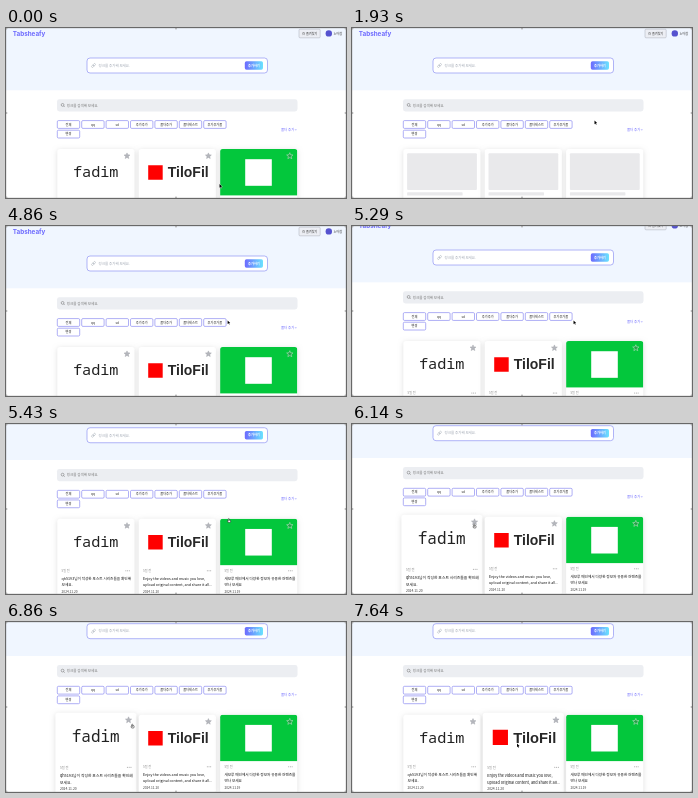
Recreate the animation shown at these times as an HTML page with a canvas. Size 340 by 170 pixels, loop 8000 ms.

```html
<!DOCTYPE html>
<html lang="ko">
<head>
<meta charset="utf-8">
<title>Link library</title>
<style>
  html, body { margin: 0; width: 100%; height: 100%; overflow: hidden; background: #fff; }
  canvas { display: block; width: 340px; height: 170px; }
</style>
</head>
<body>
<canvas id="stage"></canvas>
<script>
const W = 340, H = 170, LOOP = 8000, STEP = 1000 / 14;
const SANS = '"Noto Sans CJK KR", "Noto Sans CJK", "Noto Sans", sans-serif';
const PURPLE = '#6d6afe';
const canvas = document.getElementById('stage');
const ctx = canvas.getContext('2d');
const ratio = window.devicePixelRatio || 1;
canvas.width = W * ratio;
canvas.height = H * ratio;

// Key lists: [time, value, ...]
const SCROLL = [[5214, 0], [5286, 6], [5357, 18], [5429, 26.3], [5500, 27.4], [5643, 28.1], [5790, 28.3]];
const POINTER = [
  [0, 213.5, 156], [72, 223, 140], [143, 235, 112], [214, 242.5, 92.5],
  [2357, 242.5, 92.5], [2429, 237, 93], [2500, 228, 93.5], [2571, 222, 94],
  [5429, 221.5, 94.5], [5571, 205, 98], [5786, 130, 103], [6000, 121, 100],
  [6143, 121, 100], [6286, 160, 110], [6430, 235, 116], [6571, 240, 116],
  [6714, 165, 108], [6857, 125, 102], [6929, 126, 103],
  [7071, 126, 103], [7143, 132, 106], [7286, 160, 119], [7429, 165, 121.5]
];
const HOVER = [
  [[5720, 0], [5930, 1], [6210, 1], [6350, 0], [6650, 0], [6850, 1], [7130, 1], [7350, 0]],
  [[5590, 0], [5680, .5], [5850, 0], [6230, 0], [6330, .6], [6480, 0], [6600, 0], [6690, .6], [6820, 0], [7130, 0], [7400, 1]],
  [[5450, 0], [5570, .6], [5720, 0], [6360, 0], [6500, 1], [6590, 1], [6730, 0]]
];

const CHIPS = ['전체', 'qq', 'sd', '추가추가', '폴더추가', '폴더테스트', '추가추가폴', '변경'];
const CARDS = [
  { x: 51.3, art: codeArt, lines: ['qh5193님이 작성한 포스트 시리즈들을 확인해', '보세요.'], date: '2024.11.20' },
  { x: 132.7, art: videoArt, lines: ['Enjoy the videos and music you love,', 'upload original content, and share it all...'], date: '2024.11.20' },
  { x: 214.1, art: portalArt, lines: ['새모루 메인에서 다양한 정보와 유용한 컨텐츠를', '만나 보세요'], date: '2024.11.19' }
];
const CARD_W = 77.2, CARD_H = 78, CARD_Y = 121, ART_H = 46.4;

function sample(keys, t, i = 1) {
  if (t <= keys[0][0]) return keys[0][i];
  for (let k = 1; k < keys.length; k++) {
    const a = keys[k - 1], b = keys[k];
    if (t <= b[0]) return a[i] + (b[i] - a[i]) * (t - a[0]) / (b[0] - a[0]);
  }
  return keys[keys.length - 1][i];
}

function box(x, y, w, h, r, fill, stroke, line = .5) {
  ctx.beginPath();
  ctx.roundRect(x, y, w, h, r);
  if (fill) { ctx.fillStyle = fill; ctx.fill(); }
  if (stroke) { ctx.strokeStyle = stroke; ctx.lineWidth = line; ctx.stroke(); }
}

function disc(x, y, r, fill) {
  ctx.beginPath();
  ctx.arc(x, y, r, 0, Math.PI * 2);
  ctx.fillStyle = fill;
  ctx.fill();
}

function text(str, x, y, size, color, { align = 'left', weight = 400, font = SANS } = {}) {
  ctx.font = `${weight} ${size}px ${font}`;
  ctx.textAlign = align;
  ctx.textBaseline = 'alphabetic';
  ctx.fillStyle = color;
  ctx.fillText(str, x, y + size * .36);
}

function star(x, y, r, fill, stroke, line = .5) {
  ctx.beginPath();
  for (let i = 0; i < 10; i++) {
    const a = -Math.PI / 2 + i * Math.PI / 5, d = i % 2 ? r * .45 : r;
    ctx.lineTo(x + d * Math.cos(a), y + d * Math.sin(a));
  }
  ctx.closePath();
  if (fill) { ctx.fillStyle = fill; ctx.fill(); }
  ctx.strokeStyle = stroke;
  ctx.lineWidth = line;
  ctx.stroke();
}

function header() {
  ctx.fillStyle = '#f0f6ff';
  ctx.fillRect(0, 0, W, 62.3);
  text('Tabsheafy', 6.8, 5.4, 6.3, PURPLE, { weight: 700, font: 'Inter, sans-serif' });
  box(293, 1.2, 21.2, 8.6, 1, '#eceef4', '#a9adb8');
  star(297.6, 5.5, 1.5, null, '#555', .35);
  text('즐겨찾기', 300, 5.5, 3.1, '#333');
  disc(322.8, 5.4, 3.2, '#5552cf');
  text('노아람', 327.4, 5.4, 3.2, '#333');
}

function addForm() {
  box(81, 30, 180.5, 15, 3, '#fff', '#7f84f2', .6);
  ctx.save();
  ctx.translate(87.5, 37.5);
  ctx.rotate(-Math.PI / 4);
  box(-2.4, -.9, 2.7, 1.8, .9, null, '#9fa6b2', .45);
  box(-.3, -.9, 2.7, 1.8, .9, null, '#9fa6b2', .45);
  ctx.restore();
  text('링크를 추가해 보세요.', 92.5, 37.5, 3.5, '#9fa6b2');
  const blend = ctx.createLinearGradient(238.8, 0, 257, 0);
  blend.addColorStop(0, PURPLE);
  blend.addColorStop(1, '#6ae3fe');
  box(238.8, 33.2, 18.2, 8.6, 1.7, blend);
  text('추가하기', 247.9, 37.5, 3.2, '#fff', { align: 'center', weight: 700 });
}

function searchBar() {
  box(51, 71.3, 240.5, 12.2, 2.4, '#eceef2');
  ctx.beginPath();
  ctx.arc(56.6, 76.9, 1.4, 0, Math.PI * 2);
  ctx.moveTo(57.6, 77.9);
  ctx.lineTo(58.7, 79);
  ctx.strokeStyle = '#666';
  ctx.lineWidth = .5;
  ctx.stroke();
  text('링크를 검색해 보세요.', 60.8, 77.3, 3.5, '#777');
}

function folders() {
  CHIPS.forEach((name, i) => {
    const x = 51.3 + (i % 7) * 24.4, y = i < 7 ? 92.6 : 102.2;
    box(x, y, 22.4, 7.8, 1.2, '#fff', '#7a79ef', .6);
    text(name, x + 11.2, y + 3.9, 3.2, '#222', { align: 'center' });
  });
  text('폴더 추가 +', 291, 101.3, 3.45, PURPLE, { align: 'right' });
}

function codeArt(x) {
  text('fadim', x + 38.4, 143.4, 15.2, '#222', { align: 'center', font: '"Noto Sans Mono", monospace' });
}

function videoArt(x) {
  box(x + 9.5, 137.2, 14.5, 14.5, 0, '#f00');
  text('TiloFil', x + 29, 144.3, 14, '#282828', { weight: 700, font: '"Liberation Sans", sans-serif' });
}

function portalArt(x) {
  ctx.fillStyle = '#03c73c';
  ctx.fillRect(x, CARD_Y, CARD_W, ART_H);
  ctx.fillStyle = '#fff';
  ctx.fillRect(x + 25.1, 131.2, 26.6, 26.6);
}

function cardBase(x) {
  ctx.save();
  ctx.shadowColor = 'rgba(0,0,0,.13)';
  ctx.shadowBlur = 5 * ratio;
  ctx.shadowOffsetY = ratio;
  box(x, CARD_Y, CARD_W, CARD_H, 2.5, '#fff');
  ctx.restore();
}

function card({ x, art, lines, date }, hover) {
  const cx = x + CARD_W / 2, cy = CARD_Y + CARD_H / 2, scale = 1 + .05 * hover;
  ctx.save();
  ctx.translate(cx, cy);
  ctx.scale(scale, scale);
  ctx.translate(-cx, -cy);
  cardBase(x);
  ctx.save();
  ctx.beginPath();
  ctx.roundRect(x, CARD_Y, CARD_W, CARD_H, 2.5);
  ctx.clip();
  art(x);
  ctx.restore();
  if (art === portalArt) star(x + 69.7, 128, 3.3, 'rgba(80,110,85,.45)', '#d3e8d8');
  else star(x + 69.7, 128, 3.1, '#b4b6bc', '#a4a6ad');
  text('5일 전', x + 4.3, 173.2, 3.1, '#888');
  for (let i = 0; i < 3; i++) disc(x + 68.6 + i * 1.7, 173, .5, '#999');
  lines.forEach((line, i) => text(line, x + 4.3, 180.9 + i * 6.4, 3.65, '#111'));
  text(date, x + 4.3, 193.8, 3.2, '#333');
  ctx.restore();
}

function skeleton({ x }) {
  cardBase(x);
  box(x + 3.8, 125.2, 69.8, 36.8, 1, '#e9e9eb');
  box(x + 3.8, 164.3, 55.5, 3.3, .6, '#e9e9eb');
}

function pointer(x, y) {
  ctx.beginPath();
  for (const [dx, dy] of [[0, 0], [0, 3.7], [.9, 2.9], [1.5, 4.2], [2.1, 3.9], [1.5, 2.7], [2.6, 2.6]]) {
    ctx.lineTo(x + dx, y + dy);
  }
  ctx.closePath();
  ctx.strokeStyle = '#fff';
  ctx.lineWidth = .6;
  ctx.stroke();
  ctx.fillStyle = '#000';
  ctx.fill();
}

function hand(x, y) {
  box(x + .2, y + 1.5, 2.9, 2.5, .9, '#fff', '#111', .5);
  box(x + .8, y, .9, 2.6, .4, '#fff', '#111', .4);
}

function windowEdge() {
  ctx.strokeStyle = 'rgba(120,120,125,.35)';
  ctx.lineWidth = .5;
  ctx.strokeRect(.25, .25, W - .5, H - .5);
  for (const x of [.5, W / 2, W - .5]) {
    for (const y of [.5, H / 2, H - .5]) {
      if (x !== W / 2 || y !== H / 2) disc(x, y, .9, '#aaa');
    }
  }
}

function draw(now) {
  const t = Math.floor((now % LOOP + 5) / STEP) * STEP;
  const loading = t > 1900 && t < 4840;
  ctx.setTransform(ratio, 0, 0, ratio, 0, 0);
  ctx.fillStyle = '#fff';
  ctx.fillRect(0, 0, W, H);
  ctx.save();
  ctx.translate(0, -sample(SCROLL, t));
  header();
  addForm();
  searchBar();
  folders();
  CARDS.forEach((c, i) => loading ? skeleton(c) : card(c, sample(HOVER[i], t)));
  ctx.restore();
  windowEdge();
  const x = sample(POINTER, t), y = sample(POINTER, t, 2);
  (t > 5400 && t < 7630 ? hand : pointer)(x, y);
}

const start = performance.now();
function tick() {
  draw(performance.now() - start);
  requestAnimationFrame(tick);
}
tick();
</script>
</body>
</html>
```
